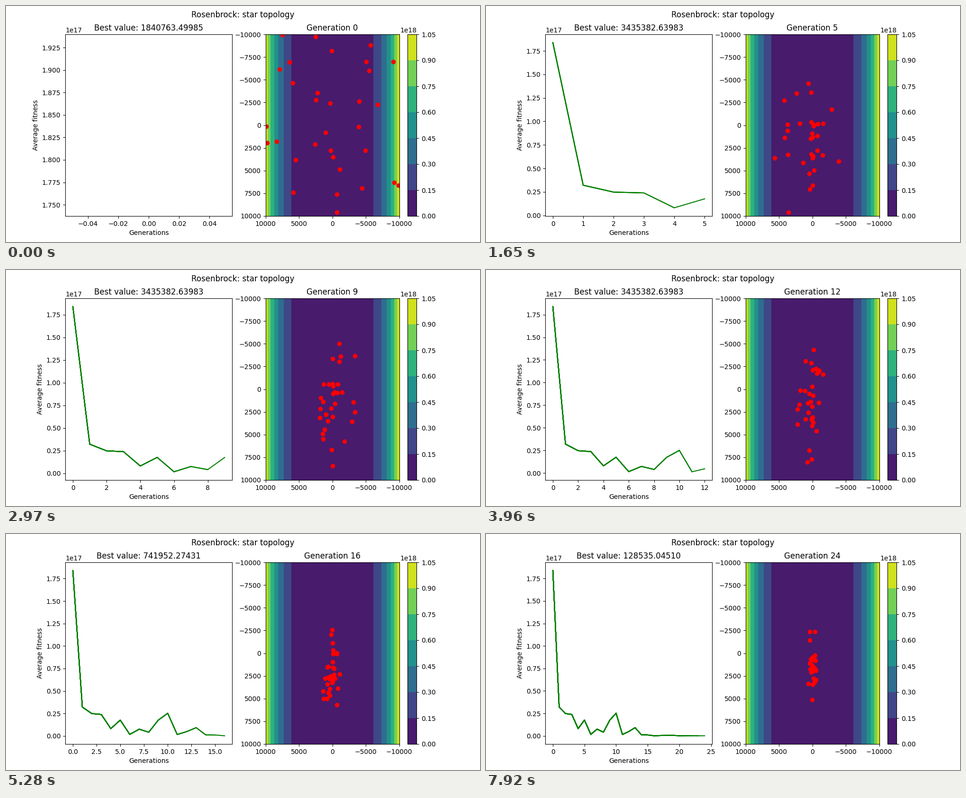
A matplotlib script for the animation above (8 s loop, 1000 px wide and 500 px high).

```python
import numpy as np
import matplotlib.pyplot as plt
from matplotlib.animation import FuncAnimation

FRAMES, INTERVAL = 100, 80
HOLD = 330            # ms per generation
LAST = 24
COUNT = 32            # particles
BOUND = 10000

FITNESS = np.array([
    1.8386, .321, .248, .239, .081, .176, .017, .075, .041, .175, .252, .0155,
    .048, .092, .012, .010, .0015, .004, .005, .006, .0012, .002, .0022,
    .0013, .0015]) * 1e17

# first generation at which each best value is reported
BEST = {0: 1840763.49985, 1: 3435382.63983, 13: 741952.27431,
        17: 1062817.40356, 18: 220234.96239, 22: 128535.04510}

rng = np.random.default_rng(7)
start = rng.uniform(-BOUND, BOUND, (2, COUNT))
swing = rng.uniform(0.8, 2.4, (2, COUNT))     # radians per generation


def swarm_at(gen):
    """Damped swings: fast convergence in x, slow in y around a drifting centre."""
    x, y = start * np.cos(swing * gen)
    centre = 1600 * (1 - np.exp(-gen / 3))
    return x * np.exp(-gen / 9), centre + y * np.exp(-gen / 30)


def padded(values):
    """Axis limits with a 5 % margin, widened for a single value."""
    low, high = values.min(), values.max()
    if low == high:
        half = 0.05 * abs(low) or 0.05
        low, high = low - half, high + half
    pad = 0.05 * (high - low)
    return low - pad, high + pad


fig, (curve_ax, swarm_ax) = plt.subplots(1, 2, figsize=(10, 5), dpi=100)
fig.suptitle("Rosenbrock: star topology")
curve_ax.set_xlabel("Generations")
curve_ax.set_ylabel("Average fitness")

# the whole history is plotted anew on top of itself each generation
gens = np.arange(LAST + 1)
curves = [curve_ax.plot(gens[:n + 1], FITNESS[:n + 1], color="green")[0]
          for n in gens]

side = np.linspace(-BOUND, BOUND, 21)
x, y = np.meshgrid(side, side)
field = swarm_ax.contourf(x, y, 100 * (y - x**2)**2 + (1 - x)**2)
fig.colorbar(field, ax=swarm_ax)
dots, = swarm_ax.plot([], [], "ro")
swarm_ax.set_xlim(BOUND, -BOUND)
swarm_ax.set_ylim(BOUND, -BOUND)


def update(frame):
    gen = min(LAST, (frame * INTERVAL + INTERVAL - 1) // HOLD)
    for n, line in enumerate(curves):
        line.set_visible(n <= gen)
    curve_ax.set_xlim(padded(gens[:gen + 1]))
    curve_ax.set_ylim(padded(FITNESS[:gen + 1]))
    best = BEST[max(k for k in BEST if k <= gen)]
    curve_ax.set_title(f"Best value: {best:.5f}")
    swarm_ax.set_title(f"Generation {gen}")
    dots.set_data(*swarm_at(gen))
    return curves + [dots]


anim = FuncAnimation(fig, update, frames=FRAMES, interval=INTERVAL,
                     init_func=lambda: update(0), repeat=True)
plt.show()
```
